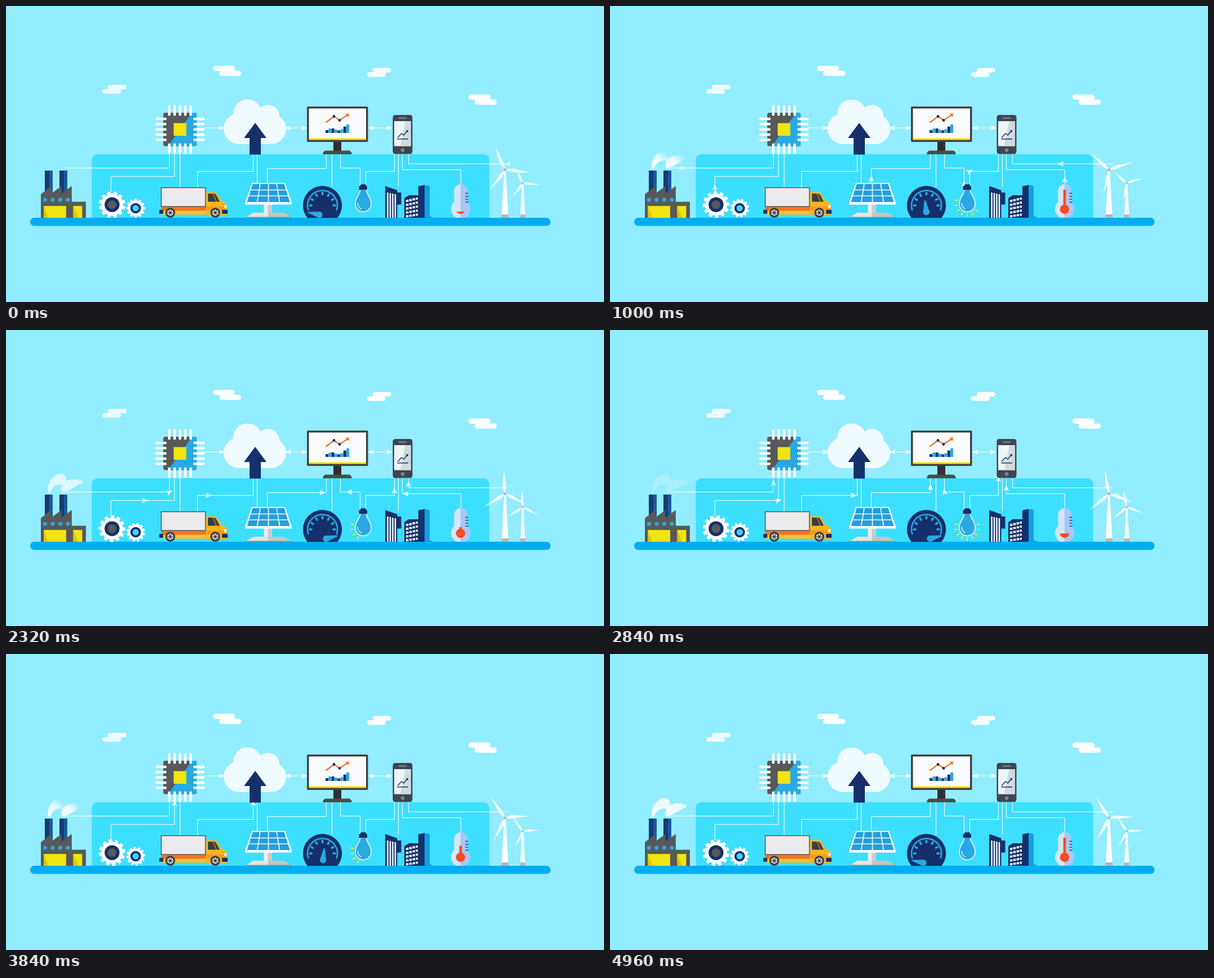
An HTML page for the animation above (5000 ms loop, 1063 by 527 pixels).

```html
<!DOCTYPE html>
<html lang="en">
<head>
<meta charset="utf-8">
<title>Connected industry</title>
<style>
html, body { margin: 0; width: 100%; height: 100%; overflow: hidden; background: #91edff; }
svg { display: block; width: 100%; height: 100%; }
</style>
</head>
<body>
<svg id="stage" viewBox="0 0 1063 527"></svg>
<script>
const LOOP = 5000, STEP = 40;
const NAVY = '#15306a', BLUE = '#29a9e3', GRAY = '#58595b', YELLOW = '#f1e413', ICE = '#f0fbff', RED = '#fb4a1d';
const HEAD = 'M6 0L-5.5 -4.5L-2.5 0L-5.5 4.5Z';

// Markup helpers
const path = (d, fill, more = '') => `<path d="${d}" fill="${fill}" ${more}/>`;
const rect = (x, y, w, h, fill, r = 0) => `<rect x="${x}" y="${y}" width="${w}" height="${h}" rx="${r}" fill="${fill}"/>`;
const circle = (x, y, r, fill) => `<circle cx="${x}" cy="${y}" r="${r}" fill="${fill}"/>`;
const line = (d, color, width = 1, more = '') => path(d, 'none', `stroke="${color}" stroke-width="${width}" ${more}`);
const repeat = (n, fn) => Array.from({ length: n }, (_, i) => fn(i)).join('');
const polar = (x, y, r, deg) => {
  const a = deg * Math.PI / 180;
  return `${(x + r * Math.cos(a)).toFixed(2)} ${(y + r * Math.sin(a)).toFixed(2)}`;
};

// Timing helpers
const clamp = v => Math.max(0, Math.min(1, v));
const ramp = (t, start, time) => (1 - Math.cos(Math.PI * clamp((t - start) / time))) / 2;

// An arrow eases along each leg of its wire in one beat, or two if the leg is long
function wire(points, start, beat) {
  let beats = 0;
  const legs = points.slice(1).map((to, i) => {
    const from = points[i], dx = to[0] - from[0], dy = to[1] - from[1];
    const leg = { dx, dy, at: beats, beats: Math.hypot(dx, dy) > 150 ? 2 : 1 };
    beats += leg.beats;
    return leg;
  });
  return { points, legs, start, beat, beats };
}

const wires = [
  wire([[105, 288.5], [290.5, 288.5], [290.5, 264]], 600, 860),
  wire([[186.5, 331], [186.5, 303.5], [299.5, 303.5], [299.5, 264]], 600, 1130),
  wire([[340.5, 323], [340.5, 294.5], [439.5, 294.5], [439.5, 264]], 1080, 960),
  wire([[464.5, 316], [464.5, 289.5], [569.5, 289.5], [569.5, 264]], 660, 905),
  wire([[629.5, 319], [629.5, 288.5], [594.5, 288.5], [594.5, 264]], 820, 980),
  wire([[639.5, 323], [639.5, 294.5], [690.5, 294.5], [690.5, 264]], 10, 980),
  wire([[697.5, 322], [697.5, 264]], 1110, 900),
  wire([[808.5, 318], [808.5, 291.5], [704.5, 291.5], [704.5, 264]], 650, 905),
  wire([[893, 281], [715.5, 281], [715.5, 264]], 40, 940)
];

function along({ points, legs }, u) {
  let [x, y] = points[0];
  for (const leg of legs) {
    const p = ramp(u, leg.at, leg.beats);
    x += leg.dx * p;
    y += leg.dy * p;
  }
  return { x, y };
}

function skyCloud(x, y, w, h, shift, fill = '#fff') {
  return rect(x, y, w, h, fill, h / 2) + rect(x + shift, y + h - .5, w, h, fill, h / 2);
}

function link(x1, x2, both) {
  const tip = (x, a) => path(HEAD, '#fff', `transform="translate(${x} 217) rotate(${a})"`);
  return line(`M${x1} 217H${x2}`, '#fff') + tip(x2 - 5, 0) + (both ? tip(x1 + 5, 180) : '');
}

function gear(id, x, y, r, core) {
  const cog = repeat(12, i => `<rect x="${-r * .13}" y="${-r}" width="${r * .26}" height="${r * .4}" rx="1" transform="rotate(${i * 30})"/>`);
  return `<g transform="translate(${x} ${y})"><g id="${id}" fill="#fff">${cog}${circle(0, 0, r * .82, '#fff')}</g>`
    + circle(0, 0, r * .56, NAVY) + circle(0, 0, r * .33, core) + '</g>';
}

function turbine(x, y, size) {
  const w = size * .13;
  const blades = repeat(3, i => path('M-1 -2L-4 -13L0 -45L2.5 -12L1 -2Z', '#f3fcff', `transform="rotate(${i * 120})"`));
  return path(`M${x - 1.3} ${y}H${x + 1.3}L${x + w} 372H${x - w}Z`, '#fff')
    + path(`M${x - w} 371H${x + w}L${x + w + 1} 378H${x - w - 1}Z`, '#b5b7ba')
    + `<g transform="translate(${x} ${y}) scale(${size / 45})"><g class="rotor">${blades}</g>${circle(0, 0, 2.6, '#b5b7ba')}</g>`;
}

// A row of puffs on a bending path, shown from the chimney upwards
function plume(id, x, drift, rise, radius) {
  const puffs = repeat(7, i => {
    const s = i / 6;
    return circle(x + drift * s ** 1.6, 287 - rise * Math.sin(s * Math.PI / 2), radius(s), '#f4fbfe');
  });
  return `<radialGradient id="${id}Fade" class="fade" gradientUnits="userSpaceOnUse" cx="${x}" cy="290" r="1">
    <stop offset=".5" stop-color="#fff"/><stop offset="1" stop-color="#fff" stop-opacity="0"/></radialGradient>
    <mask id="${id}" maskUnits="userSpaceOnUse" x="60" y="240" width="100" height="51">${rect(60, 240, 100, 51, `url(#${id}Fade)`)}</mask>
    <g mask="url(#${id})">${puffs}</g>`;
}

function factory() {
  const chimney = x => rect(x, 293, 14, 42, '#173a72') + rect(x + 8, 293, 6, 42, '#1c5a9b');
  const teeth = repeat(3, i => `L${80.5 + i * 18.2} 320.5V334`);
  return chimney(69) + chimney(95)
    + path(`M62 377V335${teeth}V348.5H142V377Z`, GRAY)
    + repeat(4, i => circle(69.5 + i * 13.5, 345, 3.6, BLUE))
    + rect(67, 356, 40, 21, YELLOW) + path('M67 356L75 377H67Z', '#d9c800')
    + rect(119.5, 356, 16, 21, YELLOW) + path('M119.5 356L128 377H119.5Z', '#d9c800');
}

function chip() {
  const pins = repeat(5, i => {
    const x = 288 + i * 9.5, y = 198.8 + i * 9.3;
    return rect(x, 176.5, 4.5, 19, '#fff', 2) + rect(x, 244.5, 4.5, 19, '#fff', 2)
      + rect(265.5, y, 20, 4.5, '#fff', 2) + rect(333, y, 20, 4.5, '#fff', 2);
  });
  return rect(279.5, 190, 59.5, 59.5, GRAY, 4)
    + path('M331 190H335Q339 190 339 194V245.5Q339 249.5 335 249.5H288Z', BLUE)
    + pins + rect(298, 208.5, 22.5, 22.5, YELLOW);
}

function bigCloud() {
  return circle(414, 218.5, 27.3, ICE) + circle(429.5, 192, 25.7, ICE) + circle(466, 196, 20, ICE)
    + circle(471, 219, 27, ICE) + rect(414, 196, 57, 50, ICE)
    + path('M443 208L463 235H453V264.5H433V235H423Z', NAVY);
}

function monitor() {
  const bars = repeat(8, i => {
    const h = 5 + i * i * .15 + 3 * Math.sin(i * 1.1);
    return rect(568 + i * 5.3, 226 - h, 5, h, i % 2 ? BLUE : NAVY);
  });
  return rect(535, 179, 108.5, 63, '#414042', 2) + rect(538.5, 182.5, 101.5, 53.5, '#fafcff') + rect(538.5, 235.5, 101.5, 3, '#f2e600')
    + rect(582, 242, 14, 17, '#2f2f31') + path('M567 257.5H611L614.5 261V264H563.5V261Z', '#4b4b4d') + bars
    + line('M568.5 207.5L583 196.5L593 203.5L607 194', '#f36f21', 2.2) + path('M610 191.5L608.8 198L603.5 192Z', '#f36f21')
    + circle(583, 196.5, 2.4, NAVY) + circle(593, 203.5, 2.4, NAVY);
}

function phone() {
  return rect(687.5, 194, 35, 69.5, '#3e4553', 4.5) + rect(690, 205, 30, 44.5, '#eef5f6')
    + path('M710 205H720V249.5H701Z', '#d0dadd')
    + line('M698.5 199.5H711.5', '#87909a', 1.8, 'stroke-linecap="round"') + circle(705, 256.5, 3.3, '#7b8490')
    + line('M696 234.5L703 227L707 230L713 223M695.5 236.7H715', NAVY, 1.4) + path('M715 221L714.5 225.5L710.5 221.5Z', NAVY);
}

function truck() {
  const wheel = x => circle(x, 368, 8.7, '#3b3b3d') + circle(x, 368, 5.6, '#e8e8e8') + circle(x, 368, 1.8, '#3b3b3d')
    + repeat(3, i => line('M-5 0H5', '#3b3b3d', 1.3, `transform="translate(${x} 368) rotate(${i * 60})"`));
  return rect(276, 357, 82, 8, '#f37423') + rect(276, 364.5, 82, 7, '#fbc02d')
    + path('M355.5 331.5H370Q374 331.5 377 337L384 348L390 350Q392.5 351.5 392.5 356V372H355.5Z', '#fbb51b')
    + rect(355.5, 357, 37, 7, '#f59a1f')
    + path('M359 334H369.5Q372 334 374.5 338L380 348.5H359Z', '#3c3d40') + line('M368 334L374 348.5', '#fbb51b')
    + rect(276, 323.5, 78.5, 33.5, '#ebebed') + line('M276 323.5H354.5V357H276Z', '#55565a', 1.5)
    + rect(272.5, 363, 7, 7, NAVY, 1) + rect(384, 363, 10, 7, NAVY, 1) + rect(388, 355, 4, 5, '#fff', 1)
    + wheel(292) + wheel(372);
}

function solar() {
  const cols = repeat(3, i => `M${452 + i * 14.5} 316L${446.5 + i * 20} 350`);
  return rect(458.5, 352, 14, 18, '#eeeeee') + rect(465.5, 352, 7, 18, '#c9cbce')
    + path('M440 368H494L508 377H425Z', '#c3c5c8') + path('M440 368H466V377H425Z', '#e3e4e6') + rect(425, 375.5, 83, 1.8, '#8f9194')
    + path('M437 315H496L508 350V353.5H425V350Z', '#fff') + path('M438.5 317H494.5L504.5 349H428.5Z', '#239fdc')
    + line(cols + 'M434 327.5H499M430 338H503', '#f2fbff', 1.7);
}

function gauge() {
  const at = (r, a) => polar(562.5, 355, r, a);
  return '<clipPath id="ground"><rect x="500" y="300" width="100" height="77.2"/></clipPath><g clip-path="url(#ground)">'
    + circle(562.5, 355, 34.7, NAVY)
    + line(`M${at(26.5, 160)}A26.5 26.5 0 1 1 ${at(26.5, 20)}`, BLUE, 2.6)
    + line(repeat(7, i => `M${at(18, 180 + i * 30)}L${at(24, 180 + i * 30)}`), BLUE, 3.4)
    + `<g id="needle">${path('M-1 -27H1L5 -9A5.7 5.7 0 1 1 -5 -9Z', BLUE)}</g></g>`;
}

function bulb() {
  const rays = repeat(9, i => {
    const a = 197 - i * 26.75;
    return line(`M${polar(635, 352, 17.3, a)}L${polar(635, 352, 23, a)}`, '#f6ee1c', 1.9, 'class="ray"');
  });
  const glass = 'M630 327H640Q641 333 645 339Q649 345 649 352.5A14 14 0 0 1 621 352.5Q621 345 625 339Q629 333 630 327Z';
  return rays + path(glass, BLUE, 'stroke="#e2f8ff" stroke-width="1.7"')
    + line('M625 351Q625.5 358 631 361', '#d9f5ff', 1.6, 'stroke-linecap="round"')
    + rect(630, 317.5, 10, 4, NAVY, 1.5) + rect(627.5, 320.5, 14.5, 7, NAVY, 1.5);
}

function buildings() {
  const stripes = repeat(4, i => line(`M${678.5 + i * 4.5} ${332 + i}V377`, '#eefaff', 2.5));
  const windows = repeat(5, i => line(`M711 ${347.5 + i * 6.8}L732 ${342.5 + i * 7.2}`, '#eefaff', 3.8, 'stroke-dasharray="4.5 1.5"'));
  return path('M674 320.5L695.5 328V377H674Z', NAVY) + stripes + rect(695, 332, 7.5, 21.5, NAVY)
    + path('M708 342L716 337H735V377H708Z', NAVY) + windows
    + path('M733 321L744.5 318.5V377H733Z', NAVY) + path('M744.5 318.5L753 320.5V374L760 377H744.5Z', '#0e9fe6');
}

function thermometer() {
  const shape = 'M796.5 329A11.7 11.7 0 0 1 820 329V349A17 17 0 0 1 815 377H801A17 17 0 0 1 796.5 349Z';
  return path(shape, '#d3e6fc')
    + '<clipPath id="half"><rect x="808" y="310" width="30" height="70"/></clipPath>' + path(shape, '#a9c7f6', 'clip-path="url(#half)"')
    + line(repeat(4, i => `M816.5 ${333.5 + i * 5.3}H${821 + i % 2}`), NAVY, 1.3)
    + '<clipPath id="level"><rect id="mercury" x="795" width="26" height="60"/></clipPath>'
    + `<g clip-path="url(#level)">${rect(805.8, 326, 4.6, 36, RED, 2)}${circle(808, 362, 8.2, RED)}</g>`;
}

const stage = document.getElementById('stage');
stage.innerHTML = skyCloud(181, 140.3, 33.5, 8.2, -10, '#ecfbff') + skyCloud(368, 106.5, 39, 9.3, 11)
  + skyCloud(652, 110.3, 32.5, 8.2, -10) + skyCloud(822, 157.5, 39.5, 9.4, 11)
  + path('M152.5 377V276Q152.5 264 164.5 264H847Q859 264 859 276V377Z', '#3ddfff')
  + '<g id="smoke">' + plume('left', 77, 20, 21, s => 3 + 7 * s)
  + plume('right', 102, 31, 16, s => 3 + 5.5 * Math.sin(Math.PI * s)) + '</g>'
  + turbine(918.5, 315.5, 32) + turbine(887, 291.5, 45)
  + line('M309.5 264V323M446.5 264V316M579.5 264V322', '#fff')
  + wires.map(w => line('M' + w.points.join('L'), '#fff')).join('')
  + link(352, 388) + link(497, 535, true) + link(644, 686, true)
  + wires.map(() => path(HEAD, '#fff', 'class="head"')).join('')
  + rect(43, 377, 925, 14.5, '#00adf1', 7.2)
  + factory() + chip() + bigCloud() + monitor() + phone()
  + gear('gearA', 188.5, 353.7, 23.7, GRAY) + gear('gearB', 230.5, 360, 16.7, '#3cd5fb')
  + truck() + solar() + gauge() + bulb() + buildings() + thermometer();

const $ = id => document.getElementById(id);
const all = name => [...stage.getElementsByClassName(name)];
const heads = all('head'), rays = all('ray'), rotors = all('rotor'), fades = all('fade');
const pose = (el, value) => el.setAttribute('transform', value);

function moveHead(head, w, t) {
  const u = (t - w.start) / w.beat;
  const p = along(w, u), a = along(w, Math.min(u, w.beats) - .12), b = along(w, Math.max(u, 0) + .12);
  const angle = Math.atan2(b.y - a.y, b.x - a.x) * 180 / Math.PI;
  pose(head, `translate(${p.x} ${p.y}) rotate(${angle})`);
  head.setAttribute('opacity', clamp(u * 8 + 1) * clamp((w.beats - u) * 8));
}

function draw(t) {
  heads.forEach((h, i) => moveHead(h, wires[i], t));

  const turn = t / LOOP * 360;
  rotors.forEach(r => pose(r, `rotate(${turn * 3 - 23})`));
  pose($('gearA'), `rotate(${turn + 15})`);
  pose($('gearB'), `rotate(${-turn})`);

  const swing = ramp(t, 0, 2100) - ramp(t, 2840, 2120);
  pose($('needle'), `translate(563 373) rotate(${154 * swing - 78})`);

  const heat = ramp(t, 0, 1000) - ramp(t, 1000, 2300) + ramp(t, 3200, 1100);
  $('mercury').setAttribute('y', 366 - 39 * heat);

  // Rays light up one by one, stay, then go out
  const glow = (t - 580) % 1520;
  const lit = glow > 1250 ? 0 : Math.ceil(glow / 600 * 9);
  rays.forEach((r, i) => r.setAttribute('opacity', i < lit ? 1 : 0));

  const age = (t - 560) % 2870;
  fades.forEach(f => f.setAttribute('r', 1 + 90 * ramp(age, -1100, 2600) ** 2 * clamp(age / 250)));
  $('smoke').setAttribute('opacity', age < 0 ? 0 : .95 * clamp((2560 - age) / 1000));
}

function frame(now) {
  draw(Math.floor(now % LOOP / STEP) * STEP);
  requestAnimationFrame(frame);
}
draw(0);
requestAnimationFrame(frame);
</script>
</body>
</html>
```
